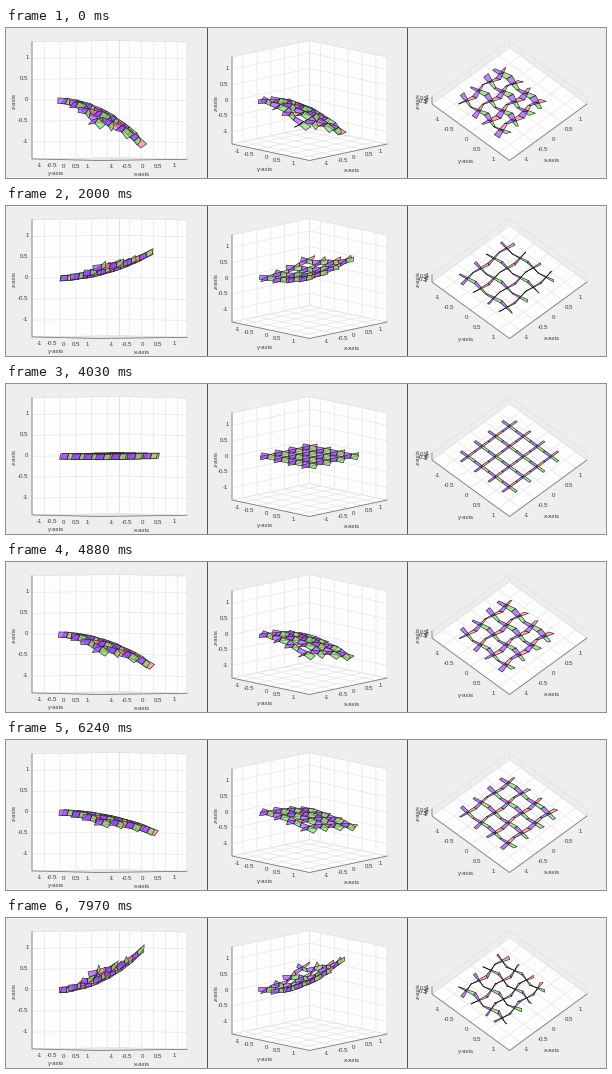
A matplotlib script for the animation above (8000 ms loop, 600 by 150 pixels).

```python
import numpy as np
import matplotlib.pyplot as plt
from matplotlib.animation import FuncAnimation
from matplotlib.collections import LineCollection, PolyCollection
from matplotlib.colors import to_rgba

W, H, DPI = 600, 150, 100
LOOP, STEP = 8000, 32
LIM = 1.4
TICKS = (-1, -0.5, 0, 0.5, 1)
PX = 72 / DPI

PURPLE, PINK, GREEN = (to_rgba(c, 0.68) for c in ("#a04cff", "#ff7f90", "#7fdc68"))
INK = "#3c3c3c"

plt.rcParams["font.family"] = "Liberation Sans"
fig = plt.figure(figsize=(W / DPI, H / DPI), dpi=DPI, facecolor="#eeeeee")
ax = fig.add_axes([0, 0, 1, 1])
ax.set_xlim(0, W)
ax.set_ylim(H, 0)
ax.axis("off")


class View:
    """Orthographic view of the cube, stretched to fill its panel."""

    def __init__(self, left, az, el):
        a, e = np.radians([az, el])
        self.cx, self.cy = left + 103.5, 72.5
        ca, sa, ce, se = np.cos(a), np.sin(a), np.cos(e), np.sin(e)
        kx = 155 / (2 * LIM * (ca + sa))
        ky = 120 / (2 * LIM * ((ca + sa) * se + ce))
        self.mat = np.array([
            [kx * ca, kx * sa, 0],
            [-ky * sa * se, ky * ca * se, -ky * ce],
        ])
        self.near = np.array([-sa * ce, ca * ce, se])

    def __call__(self, p):
        return np.asarray(p) @ self.mat.T + (self.cx, self.cy)


def label(x, y, s, size=6.2, **kw):
    kw = {"ha": "center", "va": "center", **kw}
    ax.text(x, y, s, fontsize=size * PX, color=INK, **kw)


def draw_box(view, y_off, x_off, y_pos, x_pos, z_pos, align):
    L = LIM
    walls = [
        [(-L, -L, -L), (L, -L, -L), (L, L, -L), (-L, L, -L)],
        [(-L, -L, -L), (L, -L, -L), (L, -L, L), (-L, -L, L)],
        [(L, -L, -L), (L, L, -L), (L, L, L), (L, -L, L)],
    ]
    ax.add_collection(PolyCollection([view(w) for w in walls], facecolor="#fdfdfd",
                                     edgecolor="#dcdcdc", linewidth=0.6 * PX))
    grid = []
    for t in TICKS:
        grid += [
            [(t, -L, L), (t, -L, -L), (t, L, -L)],
            [(L, t, L), (L, t, -L), (-L, t, -L)],
            [(-L, -L, t), (L, -L, t), (L, L, t)],
        ]
    ax.add_collection(LineCollection([view(g) for g in grid], colors="#e6e6e6",
                                     linewidths=0.7 * PX))
    rim = view([(-L, -L, L), (-L, -L, -L), (-L, L, -L), (L, L, -L)])
    ax.plot(*rim.T, color="#777777", lw=0.8 * PX)

    for t in TICKS:
        s = f"{t:g}"
        label(*(view((-L, t, -L)) + y_off), s, ha=align[0])
        label(*(view((t, L, -L)) + x_off), s, ha=align[1])
        label(*(view((-L, -L, t)) + (-3.5, -0.5)), s, ha="right")
    label(*y_pos, "y-axis")
    label(*x_pos, "x-axis")
    label(*z_pos, "z-axis", rotation=90)


views = [View(0, 37.5, 1), View(200, 45, 15), View(400, 45, 85)]
side = ("right", "left")
draw_box(views[0], (-2, 6.5), (-0.5, 6.5), (50, 146), (136, 146), (8.5, 73),
         ("center", "center"))
draw_box(views[1], (-3, 5.5), (3, 5.5), (259, 142), (346, 142), (210, 75), side)
draw_box(views[2], (-3, 7), (3, 7), (460, 133), (546, 133), (412, 73), side)
for x in (200.5, 400.5):
    ax.plot([x, x], [0, H], color="#555555", lw=PX)

# Woven sheet: four ribbons each way, eight panels per ribbon
ROWS = np.linspace(-0.75, 0.75, 4)
S = np.linspace(-1, 1, 9)
WAVE = np.cos(2 * np.pi * S)
SWAY, CURL, SHEAR = 0.08, 0.37, 0.06
HALF, LEAN, TWIST = 0.066, 0.03, 0.03
COLORS = np.array([PURPLE, PINK] * 16 + [PURPLE, GREEN] * 16)


def bend(t):
    """Triangle wave from -1 (down) to 1 (up)."""
    u = ((t + 100) / 5490) % 1
    return 1 - 4 * abs(u - 0.5)


def roll(d, k):
    arc = d * np.sinc(k * d / np.pi)
    rise = k * d * d / 2 * np.sinc(k * d / (2 * np.pi)) ** 2
    return arc, rise


def ribbon(row, j, across, b):
    sign = (-1) ** (j + across)
    lateral = row + sign * SWAY * b * WAVE
    x, y = (lateral, S) if across else (S, lateral)
    k = CURL * b
    shrink = 1 - (2 * np.pi * SWAY * b) ** 2 / 4
    dx, dy = shrink * (x + 1), shrink * (y + 1)
    (px, zx), (py, zy) = roll(dx, k), roll(dy, k)
    skew = SHEAR * b * b
    mid = np.stack([px - skew * py - 1, py - skew * px - 1, zx + zy], axis=1)

    up = np.stack([-np.sin(k * dx), -np.sin(k * dy), np.ones_like(S)], axis=1)
    up *= HALF / np.linalg.norm(up, axis=1, keepdims=True)
    up[:, 0 if across else 1] += LEAN + TWIST * sign * b * WAVE
    top, low = mid + up, mid - up
    return np.stack([low[:-1], low[1:], top[1:], top[:-1]], axis=1)


def sheet(b):
    return np.concatenate([ribbon(r, j, across, b)
                           for across in (0, 1) for j, r in enumerate(ROWS)])


mesh = PolyCollection([], edgecolor="#202020", linewidth=0.6 * PX, zorder=5)
ax.add_collection(mesh)


def update(i):
    quads = sheet(bend(i * STEP))
    verts, colors = [], []
    for view in views:
        order = np.argsort(quads.mean(axis=1) @ view.near)
        verts.extend(view(quads[order]))
        colors.extend(COLORS[order])
    mesh.set_verts(verts)
    mesh.set_facecolor(colors)
    return (mesh,)


anim = FuncAnimation(fig, update, frames=LOOP // STEP, interval=STEP,
                     repeat=True, repeat_delay=0)
plt.show()
```
